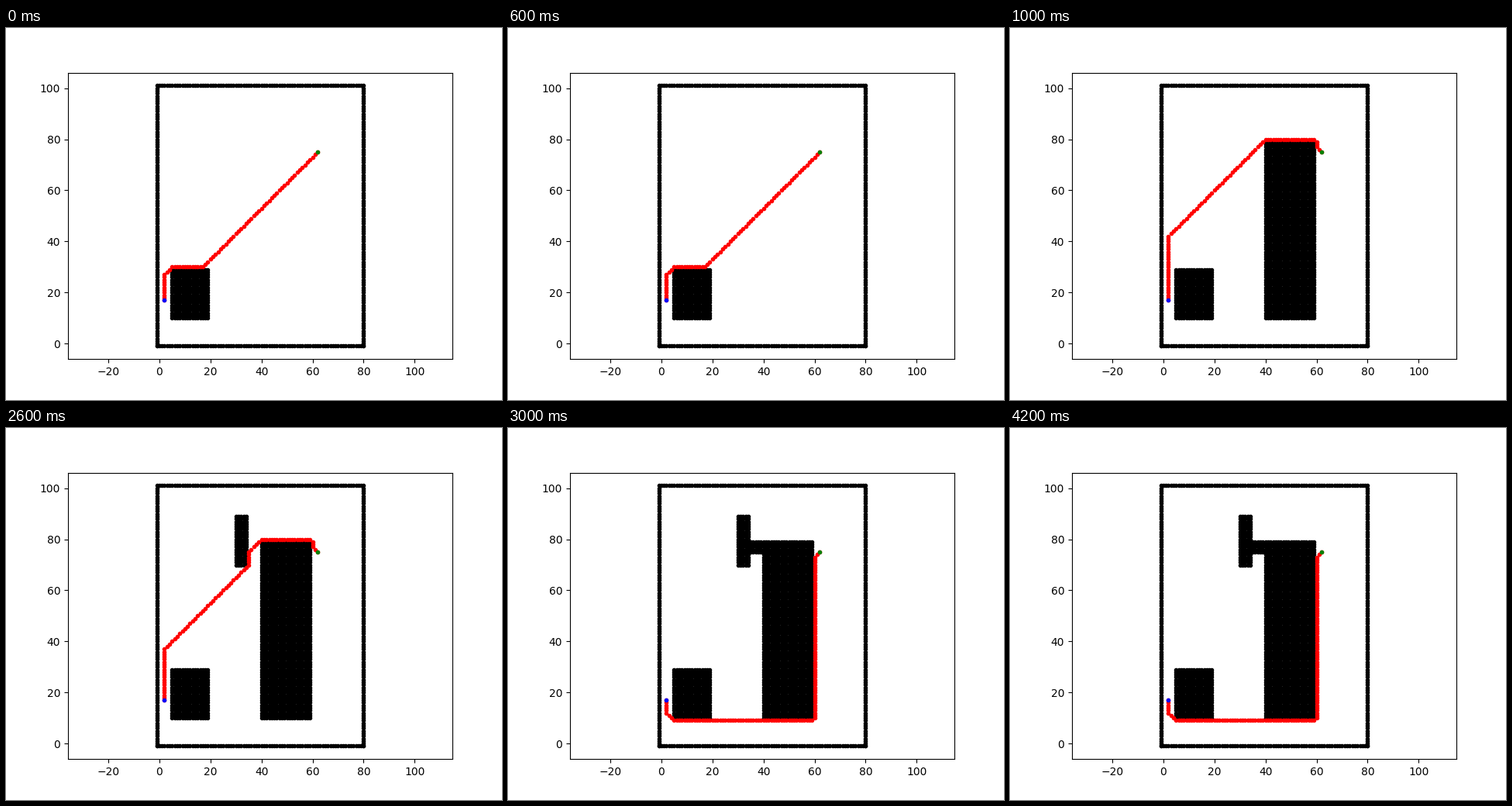
Animation, 640 px wide and 480 px high, one loop 5000 ms. Source, as a matplotlib script:

```python
import numpy as np
import matplotlib.pyplot as plt
from matplotlib.animation import FuncAnimation

WIDTH, HEIGHT = 80, 101
START, GOAL = (2, 17), (62, 75)
STRAIGHT, DIAGONAL = 5, 9

# Straight moves come first, so they win ties.
MOVES = sorted(((dx, dy) for dx in (-1, 0, 1) for dy in (-1, 0, 1) if dx or dy),
               key=lambda move: abs(move[0]) + abs(move[1]))


def move_cost(move):
    return DIAGONAL if all(move) else STRAIGHT


def block(x0, x1, y0, y1):
    """All grid cells of a filled rectangle, ends included."""
    return [(x, y) for x in range(x0, x1 + 1) for y in range(y0, y1 + 1)]


def costs_to_goal(cells):
    """Cheapest cost from every free cell to GOAL, relaxed until stable."""
    free = np.ones((WIDTH + 2, HEIGHT + 2), bool)
    for x, y in cells:
        free[x + 1, y + 1] = False
    cost = np.full(free.shape, np.inf)
    cost[GOAL[0] + 1, GOAL[1] + 1] = 0
    while True:
        best = cost
        for dx, dy in MOVES:
            nearby = np.roll(cost, (-dx, -dy), (0, 1)) + move_cost((dx, dy))
            best = np.minimum(best, nearby)
        best = np.where(free, best, np.inf)
        if np.array_equal(best, cost):
            return cost
        cost = best


def plan(cells):
    """Cheapest route from START to GOAL around the blocked cells."""
    cost = costs_to_goal(cells)
    route = [START]
    while route[-1] != GOAL:
        x, y = route[-1]
        dx, dy = min(MOVES, key=lambda m: cost[x + m[0] + 1, y + m[1] + 1]
                     + move_cost(m))
        route.append((x + dx, y + dy))
    return route


# One obstacle is added at every stage, and the route is planned again.
OBSTACLES = [
    block(5, 19, 10, 29),
    block(40, 59, 10, 79),
    block(30, 34, 70, 89),
    block(35, 39, 75, 79),
]
cells = (block(-1, WIDTH, -1, -1) + block(-1, WIDTH, HEIGHT, HEIGHT)
         + block(-1, -1, -1, HEIGHT - 1) + block(WIDTH, WIDTH, -1, HEIGHT - 1))
stages = []
for obstacle in OBSTACLES:
    cells = cells + obstacle
    stages.append((cells, plan(cells)))

fig, ax = plt.subplots(figsize=(6.4, 4.8), dpi=100)
obstacle_dots, = ax.plot(*zip(*stages[0][0]), ".k")
route_dots, = ax.plot(*zip(*stages[0][1]), ".r")
ax.plot(*START, ".b")
ax.plot(*GOAL, ".g")
ax.axis("equal")


def update(frame):
    blocked, route = stages[min(frame, len(stages) - 1)]
    obstacle_dots.set_data(*zip(*blocked))
    route_dots.set_data(*zip(*route))
    return obstacle_dots, route_dots


anim = FuncAnimation(fig, update, frames=len(stages) + 1, interval=1000, repeat=True)
plt.show()
```
